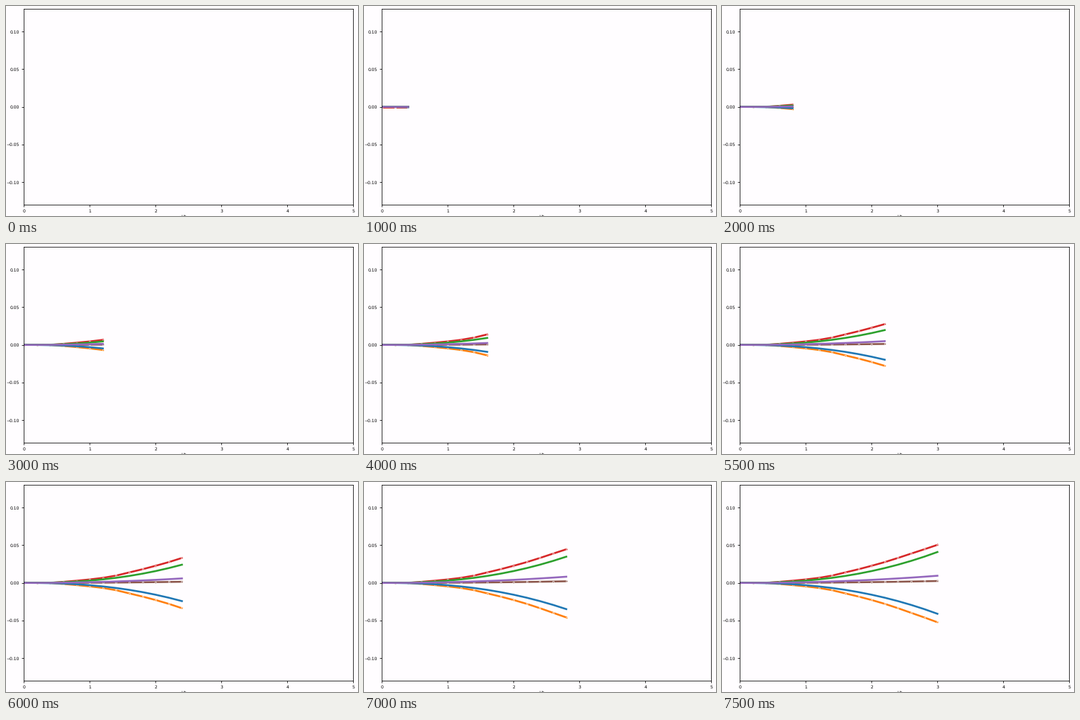
Animation of 497x297 px, one loop 8000 ms. Source, as a matplotlib script:

```python
import numpy as np
import matplotlib.pyplot as plt
from matplotlib.animation import FuncAnimation

W, H, DPI = 497, 297, 64
PT = 72 / DPI  # points per pixel
BG = "#fffdff"
STEP = 0.2
FRAMES = 16

plt.rcParams["font.family"] = "DejaVu Sans"
plt.rcParams["text.hinting"] = "none"

fig = plt.figure(figsize=(W / DPI, H / DPI), dpi=DPI, facecolor=BG)
ax = fig.add_axes([25.2 / W, 15.8 / H, 465 / W, 277 / H], facecolor=BG)
ax.set_xlim(0, 5)
ax.set_ylim(-0.13, 0.13)
ax.set_xticks(range(6))
ax.set_yticks(np.arange(-2, 3) * 0.05)
ax.tick_params(length=3.2 * PT, width=0.8 * PT, pad=3 * PT, labelsize=6 * PT)
for spine in ax.spines.values():
    spine.set_linewidth(0.8 * PT)

# The axis label is cut off by the lower edge
fig.text(251.5 / W, -3.2 / H, "U*", fontsize=6 * PT, ha="center", va="baseline")

x = np.arange(FRAMES) * STEP


def power(end, exponent):
    return end * (x / 3) ** exponent


upper = np.array([0, 0, 0, 1.4, 2.9, 4.6, 6.7, 9.7, 13.9,
                  18.1, 22.7, 27.6, 33.1, 38.9, 44.6, 50.5]) / 1000
lower = -upper * (1 + 0.035 * np.clip(x - 2, 0, 1))

# (values, colour, marked points)
series = [
    (lower, "C1", True),
    (upper, "C3", True),
    (power(0.0025, 2.2), "C5", True),
    (power(-0.041, 2.37), "C0", False),
    (power(0.041, 2.37), "C2", False),
    (power(0.0095, 2.1), "C4", False),
]

lines = []
for _, color, marked in series:
    style = dict(marker="o", markersize=2.4 * PT, markeredgecolor="white",
                 markeredgewidth=0.6 * PT) if marked else {}
    line, = ax.plot([], [], color=color, lw=2.6 * PT,
                    solid_capstyle="projecting", **style)
    lines.append(line)


def update(i):
    n = i + 1 if i else 0
    for line, (y, _, _) in zip(lines, series):
        line.set_data(x[:n], y[:n])
    return lines


anim = FuncAnimation(fig, update, frames=FRAMES, init_func=lambda: update(0),
                     interval=500, repeat=True, repeat_delay=0)
plt.show()
```
